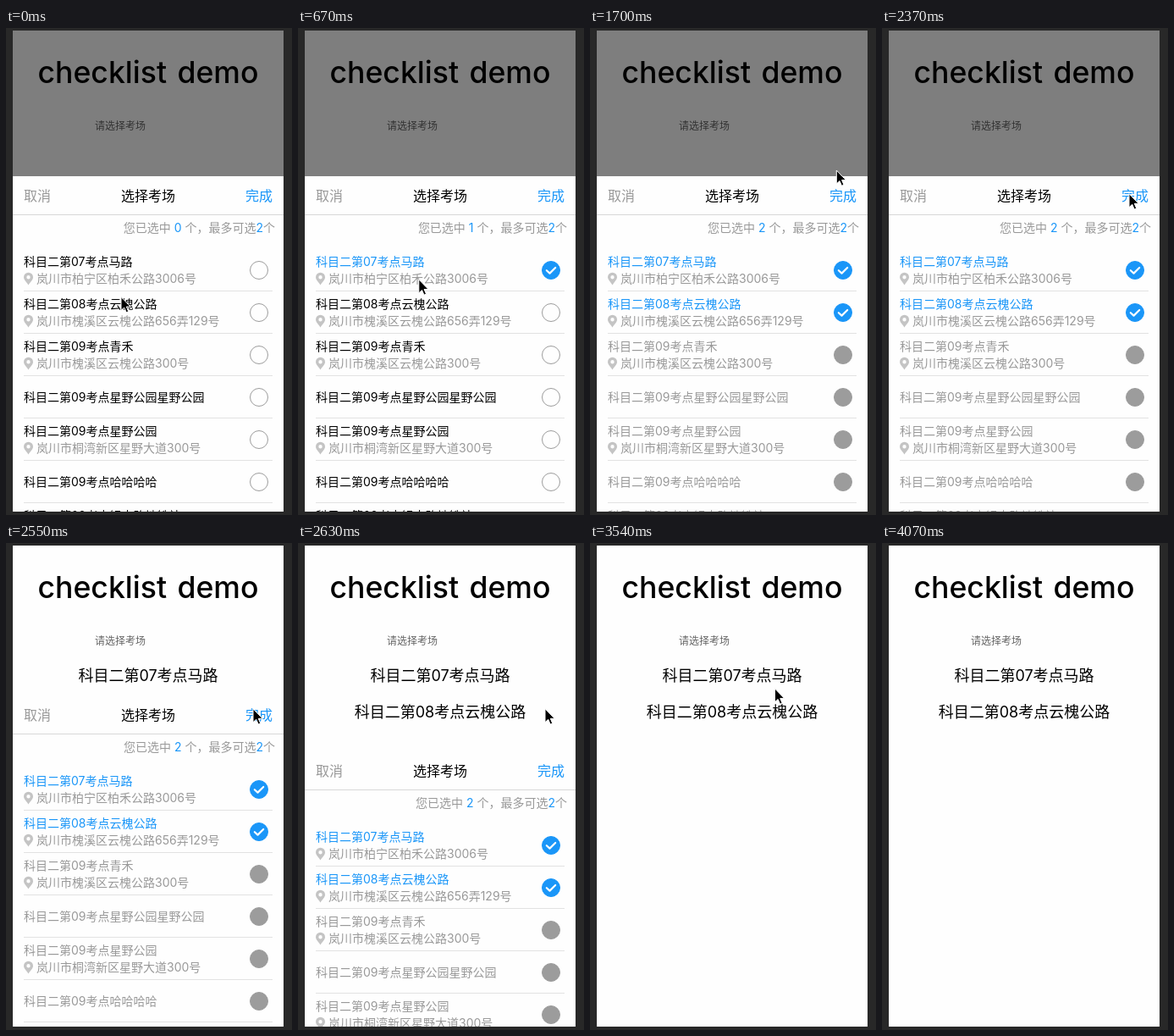
An HTML page that plays this animation: 338 by 575 pixels, repeating every 4720 ms.

```html
<!DOCTYPE html>
<html lang="zh-CN">
<head>
<meta charset="utf-8">
<title>checklist demo</title>
<style>
  html, body { margin: 0; width: 100%; height: 100%; overflow: hidden; background: #282828; }
  svg { display: block; width: 100%; height: 100%; }
  text { font-family: Inter, "Noto Sans CJK SC", "Noto Sans CJK JP", sans-serif; white-space: pre; }
  .mid { text-anchor: middle; }
  .end { text-anchor: end; }
  .small { font-size: 14px; }
  .bar { font-size: 16px; }
  .picked { font-size: 18px; }
  .grey { fill: #999; }
  .blue { fill: #1a96f8; }
  .rule { stroke: #e2e2e2; }
</style>
</head>
<body>
<svg viewBox="0 0 338 575">
  <defs>
    <clipPath id="screen"><rect x="8" y="3" width="320" height="568"/></clipPath>
  </defs>
  <rect width="338" height="575" fill="#282828"/>
  <g clip-path="url(#screen)">
    <rect x="8" y="3" width="320" height="568" fill="#fefefe"/>
    <text class="mid" x="168" y="65" font-size="35.6" font-weight="500" word-spacing="3">checklist demo</text>
    <text x="105" y="120" font-size="12" fill="#666">请选择考场</text>
    <g id="result">
      <text class="mid picked" x="168" y="163">科目二第07考点马路</text>
      <text class="mid picked" x="168" y="206">科目二第08考点云槐公路</text>
    </g>
    <rect id="shade" x="8" y="3" width="320" height="568" fill="#000" opacity=".5"/>
    <g id="panel">
      <rect x="8" y="175" width="320" height="400" fill="#fefefe"/>
      <text class="bar grey" x="21" y="204">取消</text>
      <text class="bar mid" x="168" y="204">选择考场</text>
      <text class="bar end blue" x="315" y="204">完成</text>
      <path d="M8 220.5H328" stroke="#d8d8d8"/>
      <text class="small end grey" x="318" y="241">您已选中 <tspan class="blue" id="count">0</tspan> 个，最多可选<tspan class="blue">2</tspan>个</text>
      <g id="list"></g>
    </g>
  </g>
  <path id="cursor" d="M0 0V16L3.7 12.6L6.2 18.3L8.7 17.2L6.3 11.6H11.2Z" stroke="#fff" stroke-linejoin="round"/>
</svg>
<script>
const LOOP = 4720, MAX = 2;
const $ = id => document.getElementById(id);

function add(parent, tag, attrs, text) {
  const el = document.createElementNS('http://www.w3.org/2000/svg', tag);
  for (const key in attrs) el.setAttribute(key, attrs[key]);
  if (text) el.textContent = text;
  return parent.appendChild(el);
}

const places = [
  ['07考点马路', '岚川市柏宁区柏禾公路3006号'],
  ['08考点云槐公路', '岚川市槐溪区云槐公路656弄129号'],
  ['09考点青禾', '岚川市槐溪区云槐公路300号'],
  ['09考点星野公园星野公园'],
  ['09考点星野公园', '岚川市桐湾新区星野大道300号'],
  ['09考点哈哈哈哈'],
  ['09考点银杏路地铁站', '岚川市桐湾新区星野大道600号']
];

// Each row is drawn around its own vertical centre.
const rows = places.map(([name, address], i) => {
  const g = add($('list'), 'g', { transform: `translate(0 ${286 + 50 * i})` });
  const title = add(g, 'text', { class: 'small', x: 21, y: address ? -5 : 5 }, '科目二第' + name);
  if (address) {
    add(g, 'path', {
      d: 'M26.5 17.5C24.5 14 21 11.3 21 8.2A5.5 5.5 0 0 1 32 8.2C32 11.3 28.5 14 26.5 17.5Z' +
         'M26.5 6A2.2 2.2 0 0 0 26.5 10.4A2.2 2.2 0 0 0 26.5 6Z',
      fill: '#c4c4c4', 'fill-rule': 'evenodd'
    });
    add(g, 'text', { class: 'small grey', x: 36, y: 15 }, address);
  }
  const dot = add(g, 'circle', { cx: 299, cy: 0, r: 10.5 });
  const tick = add(g, 'path', {
    d: 'M293.8 .2L297.5 3.6L304.2 -3', fill: 'none', stroke: '#fff',
    'stroke-width': 2.2, 'stroke-linecap': 'round', 'stroke-linejoin': 'round'
  });
  add(g, 'path', { class: 'rule', d: 'M21 24.5H315' });
  return { title, dot, tick };
});

function paintRows(count) {
  $('count').textContent = count;
  rows.forEach(({ title, dot, tick }, i) => {
    const on = i < count, off = !on && count === MAX;
    const colour = on ? '#1a96f8' : '#9c9c9c';
    title.style.fill = on ? colour : off ? '#999' : '#000';
    dot.setAttribute('fill', on || off ? colour : '#fefefe');
    dot.setAttribute('stroke', colour);
    tick.style.display = on ? '' : 'none';
  });
}

// Number of steps taken at time t, with n steps from a to b inclusive.
const stepsAt = (t, a, b, n) =>
  t < a ? 0 : Math.min(n, 1 + Math.floor((t - a) / (b - a) * (n - 1) + 1e-6));

const smooth = p => p * p * (3 - 2 * p);

// Cubic bezier (.25, .1, .25, 1), solved for x by bisection.
function ease(x) {
  const curve = (s, p, q) => 3 * s * (1 - s) * (1 - s) * p + 3 * s * s * (1 - s) * q + s * s * s;
  let lo = 0, hi = 1;
  for (let i = 0; i < 24; i++) {
    const mid = (lo + hi) / 2;
    if (curve(mid, .25, .25) < x) lo = mid; else hi = mid;
  }
  return curve(lo, .1, 1);
}

const start = [136, 317.5];
// start, end, steps, x, y
const legs = [
  [20, 310, 10, 142.5, 294.5],
  [670, 810, 6, 146.5, 327],
  [1440, 1700, 10, 291.3, 168],
  [1730, 1820, 4, 297.5, 162.5],
  [1850, 1960, 4, 292.5, 182.5],
  [1990, 2370, 12, 292, 195.7],
  [3310, 3740, 16, 168, 155.5],
  [3910, 4040, 6, 246, 542.5]
];

function cursorAt(t) {
  let [x, y] = start;
  for (const [a, b, n, tx, ty] of legs) {
    if (t < a) break;
    const p = smooth(stepsAt(t, a, b, n) / n);
    x += (tx - x) * p;
    y += (ty - y) * p;
  }
  return [x, y];
}

function draw(t) {
  const done = t >= 2550;
  paintRows(t < 490 ? 0 : t < 1170 ? 1 : MAX);
  $('shade').style.display = done ? 'none' : '';
  $('result').style.display = done ? '' : 'none';

  const k = stepsAt(t, 2550, 2890, 9);
  const drop = k ? 396 * ease(.025 + .975 * (k - 1) / 8) : 0;
  $('panel').setAttribute('transform', `translate(0 ${Math.round(drop)})`);
  $('panel').style.display = k === 9 ? 'none' : '';

  $('cursor').style.display = t < 4070 ? '' : 'none';
  $('cursor').setAttribute('transform', `translate(${cursorAt(t)})`);
}

const begin = performance.now();
function tick() {
  draw((performance.now() - begin) % LOOP);
  requestAnimationFrame(tick);
}
tick();
</script>
</body>
</html>
```
